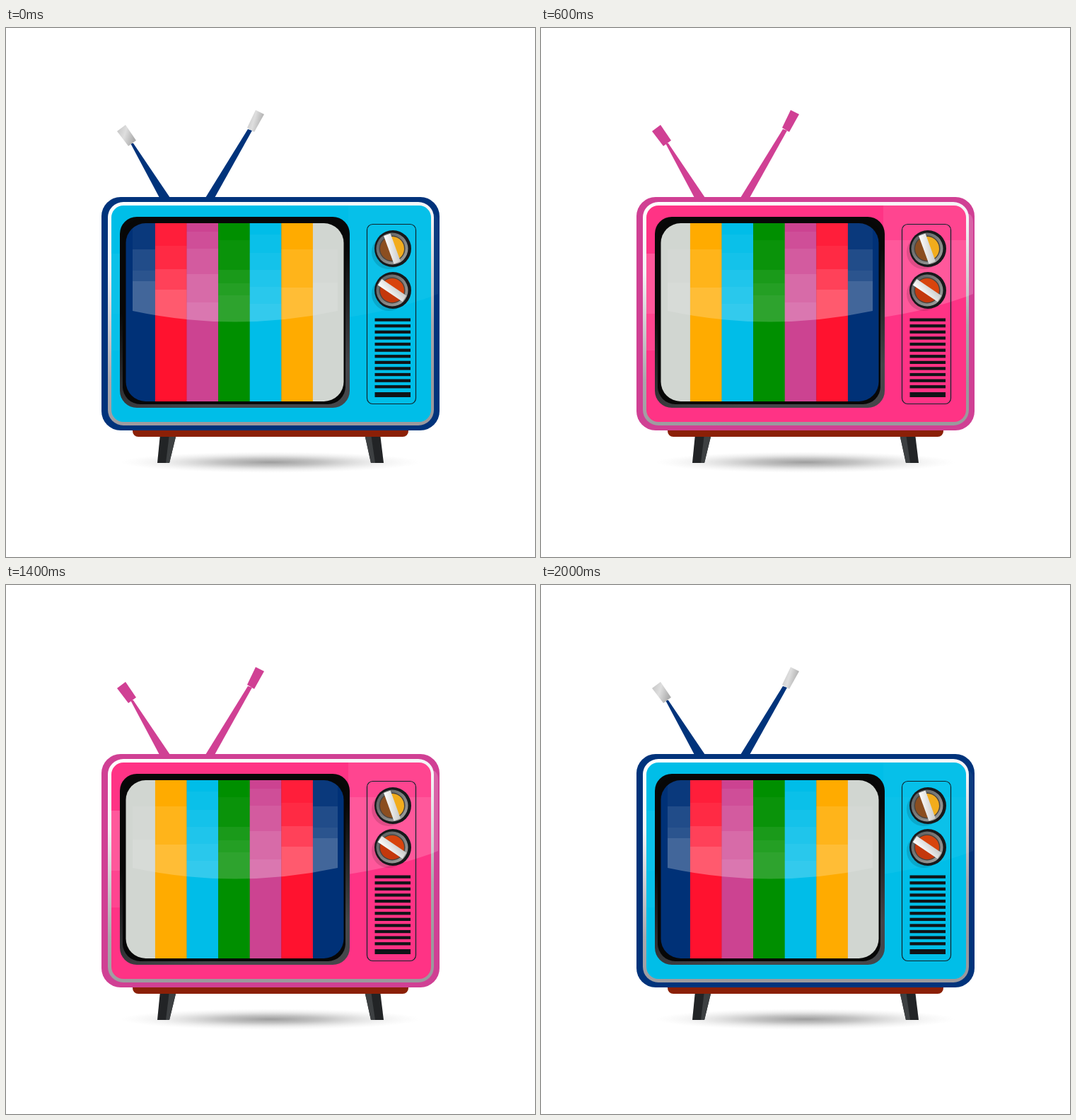
Animation, 748 px wide and 748 px high, one loop 2300 ms. Source, as an HTML page:

```html
<!DOCTYPE html>
<html lang="en">
<head>
<meta charset="utf-8">
<title>Retro television</title>
<style>
  html, body { margin: 0; width: 100%; height: 100%; overflow: hidden; background: #fff; }
  svg { display: block; width: 100%; height: 100%; }
</style>
</head>
<body>
<svg id="stage" viewBox="0 0 748 748">
  <defs>
    <linearGradient id="rim" x1="0" y1="0" x2="0.25" y2="1">
      <stop offset="0" stop-color="#fff"/>
      <stop offset=".3" stop-color="#f3f3f5"/>
      <stop offset=".75" stop-color="#aaa7ac"/>
      <stop offset="1" stop-color="#9b999d"/>
    </linearGradient>
    <linearGradient id="bezel" x1="0" y1="0" x2=".35" y2="1">
      <stop offset=".45" stop-color="#080808"/>
      <stop offset="1" stop-color="#45464a"/>
    </linearGradient>
    <linearGradient id="metal" x1="0" y1="0" x2="1" y2=".35">
      <stop offset="0" stop-color="#c3c3c3"/>
      <stop offset=".5" stop-color="#dedede"/>
      <stop offset="1" stop-color="#aeaeae"/>
    </linearGradient>
    <linearGradient id="ring" x1="0" y1="0" x2="1" y2="1">
      <stop offset="0" stop-color="#55585a"/>
      <stop offset="1" stop-color="#a5a5a2"/>
    </linearGradient>
    <linearGradient id="handle" x1="0" y1="0" x2="1" y2="1">
      <stop offset="0" stop-color="#fff"/>
      <stop offset="1" stop-color="#c9cac9"/>
    </linearGradient>
    <radialGradient id="shadow">
      <stop offset="0" stop-color="#777" stop-opacity=".72"/>
      <stop offset=".35" stop-color="#888" stop-opacity=".5"/>
      <stop offset=".7" stop-color="#aaa" stop-opacity=".2"/>
      <stop offset="1" stop-color="#ccc" stop-opacity="0"/>
    </radialGradient>
    <clipPath id="screen"><rect x="169.5" y="276" width="308" height="252" rx="28"/></clipPath>
    <clipPath id="glass"><path d="M179 276H469V400Q324 431 179 400Z"/></clipPath>
    <clipPath id="shell"><rect x="149" y="251" width="452" height="306" rx="17"/></clipPath>
  </defs>
</svg>
<script>
const LOOP = 2300, STEP = 200, LAST = 10;

// Each bar: colour, then [top, white opacity] steps of its reflection.
const BARS = [
  ['#003177', [276, .04], [313, .13], [343, .17], [358, .26]],
  ['#ff122f', [276, .05], [308, .1], [341, .2], [370, .3]],
  ['#cc4391', [288, .06], [312, .13], [348, .21], [388, .28]],
  ['#008f00', [300, .04], [342, .1], [361, .14], [378, .18]],
  ['#00bde8', [292, .04], [318, .08], [342, .12], [366, .16], [390, .2]],
  ['#ffab00', [313, .1], [367, .21]],
  ['#d1d6d1', [313, .06], [360, .12]]
];

const THEMES = [
  { frame: '#00337b', body: '#00bee8', tip: 'url(#metal)', gloss: .045, bars: BARS },
  { frame: '#d04094', body: '#ff3385', tip: '#d04094', gloss: .18, bars: [...BARS].reverse() }
];

const rect = (x, y, w, h, fill, rx = 0, more = '') =>
  `<rect x="${x}" y="${y}" width="${w}" height="${h}" rx="${rx}" fill="${fill}" ${more}/>`;
const poly = (points, fill) => `<polygon points="${points}" fill="${fill}"/>`;
const disc = (x, y, r, fill, more = '') =>
  `<circle cx="${x}" cy="${y}" r="${r}" fill="${fill}" ${more}/>`;

function antennas({ frame, tip }) {
  return poly('176,163 180,163 232,240 217,240', frame) +
    poly('342,143 348,145 295,240 282,240', frame) +
    poly('157,146 169,137 184,159 173,167', tip) +
    poly('353,116 365,122 351,147 341,141', tip);
}

function stand() {
  return '<ellipse cx="374" cy="614" rx="212" ry="15" fill="url(#shadow)"/>' +
    poly('218,574 241,574 231,615 214,615', '#222426') +
    poly('231,574 241,574 231,615 226,615', '#3d4042') +
    poly('507,574 529,574 534,615 516,615', '#222426') +
    poly('507,574 516,574 522,615 516,615', '#3d4042') +
    rect(179, 560, 390, 18, '#8b2007', 8);
}

function shell({ frame, body, gloss }) {
  const veil = `fill="#fff" fill-opacity="${gloss}"`;
  return rect(135, 239, 478, 330, frame, 27) +
    rect(144, 246, 461, 316, 'url(#rim)', 22) +
    rect(149, 251, 452, 306, body, 17) +
    `<g clip-path="url(#shell)">
      <path d="M484 300H601V380Q545 400 484 409Z" ${veil}/>
      <path d="M149 319H162V404H149Z" ${veil}/>
      <path d="M149 404H162V456H149Z" ${veil} opacity=".5"/>
      <path d="M484 251H601V300H484Z" ${veil} opacity=".5"/>
    </g>
    <path d="M601 262Q611 262 611 276V376L601 380Z" ${veil}/>`;
}

function screen({ bars }) {
  const width = 44.6, left = 166.3;
  const x = i => left + i * width;
  const fills = bars.map(([color], i) => rect(x(i), 276, width + .4, 252, color)).join('');
  const shine = bars.map(([, ...steps], i) => steps.map(([top, alpha], n) => {
    const bottom = n + 1 < steps.length ? steps[n + 1][0] : 420;
    return rect(x(i), top, width, bottom - top, '#fff', 0, `fill-opacity="${alpha}"`);
  }).join('')).join('');
  return rect(161, 267, 325, 270, 'url(#bezel)', 24) +
    rect(165, 271, 315, 261, '#070707', 25) +
    `<g clip-path="url(#screen)">${fills}<g clip-path="url(#glass)">${shine}</g></g>`;
}

function knob(y, left, right, angle) {
  return disc(541, y + 5, 24, '#000', 'fill-opacity=".13"') +
    disc(547, y, 26, '#17191b') +
    disc(546, y, 22.5, 'url(#ring)') +
    disc(546, y, 18.5, '#4a4540') +
    `<g transform="rotate(${angle} 546 ${y})">` +
    `<path d="M546 ${y - 17}a17 17 0 0 0 0 34z" fill="${left}"/>` +
    `<path d="M546 ${y - 17}a17 17 0 0 1 0 34z" fill="${right}"/>` +
    rect(541, y - 21, 10, 42, 'url(#handle)') + '</g>';
}

function controls() {
  const vents = Array.from({ length: 12 }, (_, i) => rect(521.5, 410.5 + i * 8.6, 50.5, 4.3, '#101417'));
  return rect(510.5, 277.5, 69, 254, 'none', 8, 'stroke="#10242c" stroke-width="1.2"') +
    knob(312, '#8b4e20', '#f2ac1c', -20) +
    knob(371, '#c4380c', '#d8440d', -56) +
    vents.join('') + rect(521.5, 515, 50.5, 7, '#101417');
}

const stage = document.getElementById('stage');
const scenes = THEMES.map(theme => {
  const group = document.createElementNS('http://www.w3.org/2000/svg', 'g');
  group.innerHTML = stand() + antennas(theme) + shell(theme) + screen(theme) + controls();
  stage.append(group);
  return group;
});

function show(time) {
  const step = Math.min(LAST, Math.floor(time % LOOP / STEP));
  scenes.forEach((scene, i) => scene.setAttribute('visibility', step % 2 === i ? 'visible' : 'hidden'));
}

let start;
function tick(now) {
  start ??= now;
  show(now - start);
  requestAnimationFrame(tick);
}
show(0);
requestAnimationFrame(tick);
</script>
</body>
</html>
```
